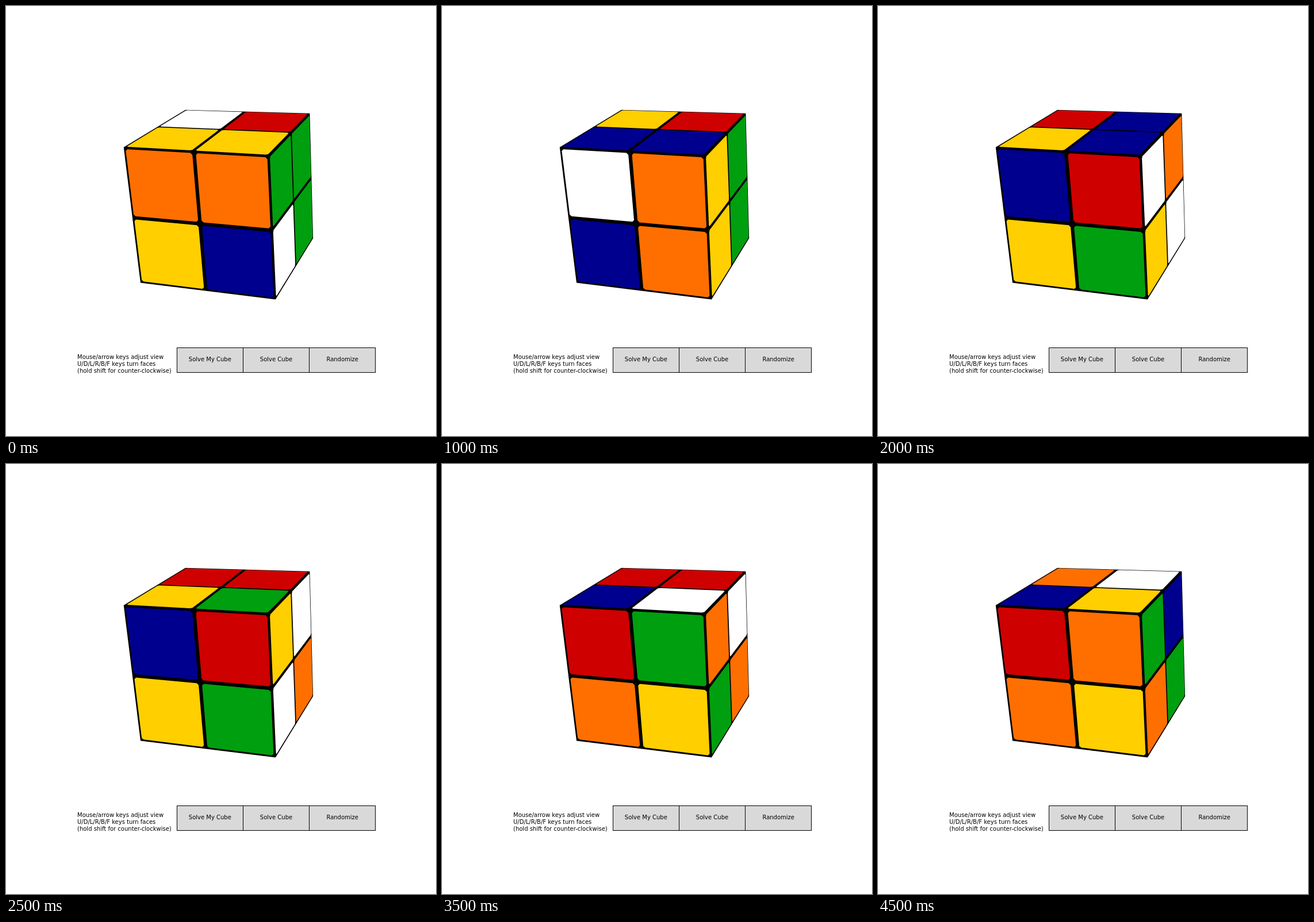
An HTML page with a canvas that plays this animation: 748x748 px, repeating every 5000 ms.

```html
<!DOCTYPE html>
<html lang="en">
<head>
<meta charset="utf-8">
<title>Pocket cube</title>
<style>
  html, body { margin: 0; width: 100%; height: 100%; overflow: hidden; background: #fff; }
  canvas { display: block; width: 748px; height: 748px; }
</style>
</head>
<body>
<canvas id="stage" width="748" height="748"></canvas>
<script>
const ctx = document.getElementById('stage').getContext('2d');

const STEP = 500;
const COLORS = { W: '#ffffff', Y: '#ffcf00', B: '#00008f', G: '#009f0f', O: '#ff6f00', R: '#cf0000' };

// Stickers per step, row by row: top, front, right.
const STATES = [
  'WRYY OOYB GGWG',
  'WRRB YOBO YGYG',
  'YRBB WOBO YGYG',
  'RBYB BRBO WOYG',
  'RBYB BRYG WOYW',
  'RRYG BRYG YWWO',
  'RRYW RGBY OWGO',
  'RRBW RGOY OWGO',
  'RGBY ROOY GOOW',
  'OWBY ROOY GBOG'
].map(s => s.split(' '));

// Visible cube corners on screen.
const backL = [312, 180.8], backR = [528.4, 186.7];
const frontL = [204.7, 245.7], frontR = [457.8, 260];
const lowL = [234, 481.4], lowR = [468.9, 510.4], lowBack = [534.2, 404];

const OUTLINE = [backL, backR, lowBack, lowR, lowL, frontL];
const FACES = [
  [backL, backR, frontR, frontL],
  [frontL, frontR, lowR, lowL],
  [frontR, backR, lowBack, lowR]
].map(perspective);

// Maps the unit square onto a quad given clockwise from its top left.
function perspective([[x0, y0], [x1, y1], [x2, y2], [x3, y3]]) {
  const dx1 = x1 - x2, dx2 = x3 - x2, sx = x0 - x1 + x2 - x3;
  const dy1 = y1 - y2, dy2 = y3 - y2, sy = y0 - y1 + y2 - y3;
  const det = dx1 * dy2 - dx2 * dy1;
  const g = (sx * dy2 - dx2 * sy) / det;
  const h = (dx1 * sy - sx * dy1) / det;
  return (u, v) => {
    const w = g * u + h * v + 1;
    return [
      ((x1 - x0 + g * x1) * u + (x3 - x0 + h * x3) * v + x0) / w,
      ((y1 - y0 + g * y1) * u + (y3 - y0 + h * y3) * v + y0) / w
    ];
  };
}

function fillPoly(points, color) {
  ctx.beginPath();
  points.forEach(p => ctx.lineTo(...p));
  ctx.closePath();
  ctx.fillStyle = color;
  ctx.fill();
}

// A sticker is a square with cut corners, in units of one facet.
const a = 0.025, b = 0.05;
const STICKER = [
  [b, a], [1 - b, a], [1 - a, b], [1 - a, 1 - b],
  [1 - b, 1 - a], [b, 1 - a], [a, 1 - b], [a, b]
];

function drawCube(state) {
  fillPoly(OUTLINE, '#000');
  FACES.forEach((project, f) => {
    for (let i = 0; i < 4; i++) {
      const col = i % 2, row = i >> 1;
      const shape = STICKER.map(([u, v]) => project((col + u) / 2, (row + v) / 2));
      fillPoly(shape, COLORS[state[f][i]]);
    }
  });
}

function drawPanel() {
  ctx.font = '10px "DejaVu Sans", sans-serif';
  ctx.textBaseline = 'alphabetic';
  ctx.textAlign = 'left';
  ctx.fillStyle = '#000';
  [
    'Mouse/arrow keys adjust view',
    'U/D/L/R/B/F keys turn faces',
    '(hold shift for counter-clockwise)'
  ].forEach((line, i) => ctx.fillText(line, 124, 614 + 12 * i));

  ctx.textAlign = 'center';
  ctx.lineWidth = 1;
  ctx.strokeStyle = '#000';
  ['Solve My Cube', 'Solve Cube', 'Randomize'].forEach((label, i) => {
    const x = 297.5 + 115 * i;
    ctx.fillStyle = '#d9d9d9';
    ctx.fillRect(x, 594.5, 115, 43);
    ctx.strokeRect(x, 594.5, 115, 43);
    ctx.fillStyle = '#000';
    ctx.fillText(label, 354.8 + 115.2 * i, 618);
  });
}

let shown = -1;
const start = performance.now();

function render() {
  const elapsed = Math.max(0, performance.now() - start);
  const step = Math.floor(elapsed / STEP) % STATES.length;
  if (step !== shown) {
    shown = step;
    ctx.fillStyle = '#fff';
    ctx.fillRect(0, 0, 748, 748);
    drawCube(STATES[step]);
    drawPanel();
  }
  requestAnimationFrame(render);
}
render();
</script>
</body>
</html>
```
